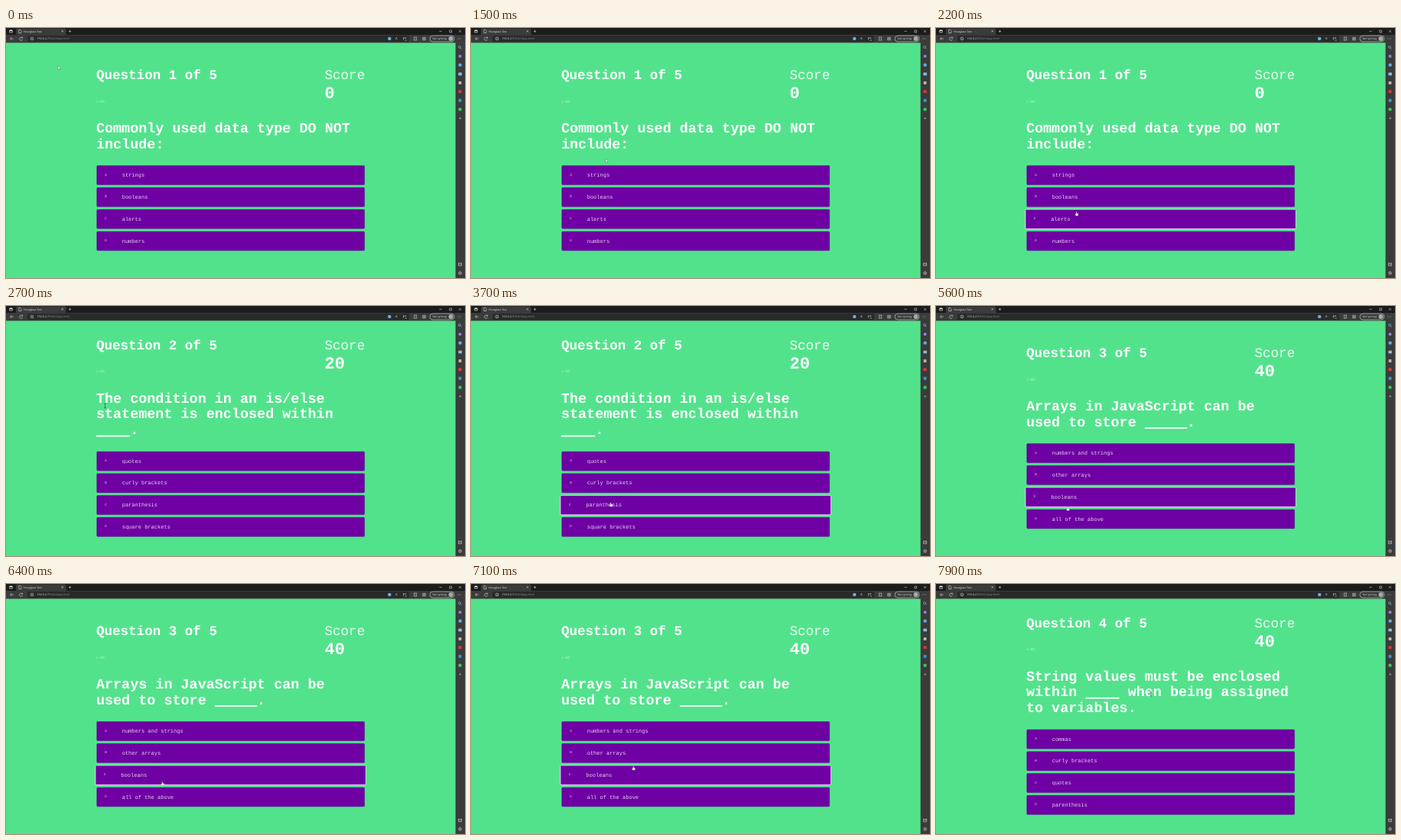
These frames come from a looping animation (600 px wide and 328 px high, 8000 ms). An HTML page:

```html
<!DOCTYPE html>
<html lang="en">
<head>
<meta charset="utf-8">
<title>Quiz</title>
<style>
  html, body { margin: 0; width: 100%; height: 100%; overflow: hidden; background: #53e28c; }
  svg { display: block; width: 100vw; height: 100vh; }
  text { white-space: pre; text-rendering: geometricPrecision; }
  .quiz { font-family: "Courier New", "Liberation Mono", monospace; fill: #fff; }
  .ui { font-family: "Open Sans", "Noto Sans", sans-serif; fill: #e6e6e6; }
  .bold { font-weight: 700; }
  .line { fill: none; stroke: #d6d6d6; stroke-width: .6; }
</style>
</head>
<body>
<svg id="stage" viewBox="0 0 600 328" xmlns="http://www.w3.org/2000/svg">
  <rect width="600" height="328" fill="#53e28c"/>
  <g id="quiz" class="quiz"></g>
  <g id="browser"></g>
  <g id="pointer">
    <path id="arrow" d="M0 0V4.2L1.1 3.3L1.9 4.9L2.7 4.5L2 3H3.2Z" fill="#fff" stroke="#333" stroke-width=".3"/>
    <path id="beam" d="M-1.2-2.8H1.2M0-2.8V2.8M-1.2 2.8H1.2" fill="none" stroke="#24543a" stroke-width=".7"/>
    <path id="hand" d="M-.5 .3Q0-.4 .5 .3V2L2.5 2.6V4.2L1.8 5.4H-.6L-1.9 3.4L-1.3 2.8L-.5 3.4Z" fill="#fff" stroke="#333" stroke-width=".2"/>
  </g>
</svg>
<script>
const LOOP = 8000;
const LINE = 20.9;
const PITCH = 28.8;
const LEFT = 117.9;
const CENTER = 293.7;
const BOX_TOP = 180.5;
const BOX_HEIGHT = 25.2;
const HEADLINE = 18.45;
const ADVANCE = HEADLINE * .6;

const questions = [
  { from: 0, score: 0,
    lines: ["Commonly used data type DO NOT", "include:"],
    choices: ["strings", "booleans", "alerts", "numbers"] },
  { from: 2600, score: 20,
    lines: ["The condition in an is/else", "statement is enclosed within", "____."],
    choices: ["quotes", "curly brackets", "paranthesis", "square brackets"] },
  { from: 4200, score: 40,
    lines: ["Arrays in JavaScript can be", "used to store _____."],
    choices: ["numbers and strings", "other arrays", "booleans", "all of the above"] },
  { from: 7600, score: 40,
    lines: ["String values must be enclosed", "within ____ when being assigned", "to variables."],
    choices: ["commas", "curly brackets", "quotes", "parenthesis"] }
];

// time, x, y of the pointer's hot spot
const path = [
  [0, 68, 50], [900, 118, 108], [1500, 176, 172], [1800, 188, 250],
  [2100, 188, 250], [2700, 129.5, 131], [3200, 180, 261], [3600, 182, 261],
  [4400, 197.5, 187.5], [5000, 188, 250], [5600, 172, 263.2], [5900, 184, 318],
  [6300, 203, 260], [6400, 204.3, 259.2], [6900, 204, 250], [7900, 281, 144]
];

const byId = id => document.getElementById(id);

function add(parent, tag, attrs, content) {
  const node = document.createElementNS("http://www.w3.org/2000/svg", tag);
  for (const key in attrs) node.setAttribute(key, attrs[key]);
  if (content !== undefined) node.textContent = content;
  parent.appendChild(node);
  return node;
}

function label(parent, x, y, size, content, attrs = {}) {
  return add(parent, "text", { x, y, "font-size": size, ...attrs }, content);
}

function buildBrowser() {
  const g = byId("browser");
  const rect = (x, y, width, height, fill, rx = 0) => add(g, "rect", { x, y, width, height, fill, rx });
  const dot = (cx, cy, r, fill) => add(g, "circle", { cx, cy, r, fill });
  const line = (d, stroke = "#d6d6d6") => add(g, "path", { d, class: "line", style: `stroke:${stroke}` });
  const ring = (cx, cy, r) => add(g, "circle", { cx, cy, r, class: "line" });
  const ui = (x, y, size, content, attrs) => label(g, x, y, size, content, { class: "ui", ...attrs });

  rect(0, 0, 600, 9.5, "#1c1c1c");
  rect(0, 9, 600, 10.4, "#3b3b3b");
  rect(587.6, 19, 12.4, 309, "#3b3b3b");
  rect(13, .5, 65.5, 9.5, "#3b3b3b", 1.5);

  rect(4.5, 2.5, 4, 3.8, "#e8e8e8", .6);
  rect(5.2, 4, 2.6, 1.6, "#1c1c1c");
  line("M16.8 2.3H18.8L20 3.5V6.5H16.8Z");
  ui(23, 5.7, 3.5, "Hourglass Test");
  line("M72.5 3L75 5.5M75 3L72.5 5.5");
  line("M81.8 4.3H85.2M83.5 2.6V6");
  line("M566.5 4.3H569.7M592 2.8L595 5.8M595 2.8L592 5.8");
  line("M579.8 3H582.6V5.8H579.8Z");

  line("M10 14H5.5M7.5 12L5.5 14L7.5 16");
  line("M21.4 13A2.1 2.1 0 1 0 21.6 15M21.6 11.7V13.2H20.1");
  rect(28, 10, 499, 8.2, "#2a2a2a", 1.5);
  ring(34, 14, 1.9);
  line("M34 13.6V15.1M34 12.6V13");
  const address = ui(40.5, 15.3, 3.7, "192.0.2.7");
  add(address, "tspan", { fill: "#8b8b8b" }, ":8040/play.html");

  rect(499.3, 12, 4, 4, "#69aee8", 1.2);
  ui(509, 15.4, 4, "A", { fill: "#8d8d8d" });
  line("M519.5 15.6V12.4L521 13.5L522.6 12.4V14M521.5 16H524");
  line("M533 12H537L536 14L537 16H533L534 14Z");
  line("M544.7 12.3H548.3V15.9H544.7ZM546.5 13V15.2M545.4 14.1H547.6");
  add(g, "rect", { x: 554, y: 10, width: 32, height: 8, rx: 4, class: "line" });
  ui(557.5, 15.3, 3.4, "Not syncing");
  dot(581.5, 14, 3, "#a9a9a9");
  for (const x of [590.6, 592.4, 594.2]) dot(x, 14, .45, "#ddd");

  add(g, "circle", { cx: 593, cy: 25, r: 1.5, class: "line", style: "stroke:#8fc3f0" });
  line("M594.1 26.1L595.6 27.6", "#8fc3f0");
  dot(593.5, 37, 2, "#8c83e6");
  rect(591.6, 46.6, 4, 4, "#5eaeea", 1);
  rect(591.3, 58.6, 4.6, 3.6, "#8fbad6", .5);
  rect(591.6, 70, 3.8, 4, "#b9b5b2", .8);
  rect(591.5, 81.3, 4, 4, "#d83b36");
  dot(593.5, 95, 2.2, "#2f94dc");
  dot(593.5, 106.7, 2.2, "#35c85a");
  line("M592 118.5H595.4M593.7 116.8V120.2", "#aaa");
  add(g, "rect", { x: 591.7, y: 308.5, width: 3.8, height: 3.4, class: "line" });
  line("M592.6 310.2H594.6");
  ring(593.6, 321.5, 1.9);
  ring(593.6, 321.5, .6);
}

function buildQuiz() {
  const g = byId("quiz");
  const head = add(g, "g", {});
  const progress = label(head, LEFT, 67.3, 17.57, "", { class: "bold" });
  label(head, 416.5, 67.3, 17.57, "Score", { opacity: .88 });
  const score = label(head, 416.5, 92, 21.96, "", { class: "bold" });
  label(head, LEFT + .4, 97.6, 4.39, "1:00", { opacity: .6 });
  const lines = [0, 1, 2].map(i => label(head, LEFT, 137 + i * LINE, HEADLINE, "", { class: "bold" }));
  const blank = add(head, "rect", { height: 1.7, fill: "#fff" });

  const list = add(g, "g", {});
  const choices = [0, 1, 2, 3].map(i => {
    const y = BOX_TOP + i * PITCH;
    const group = add(list, "g", {});
    const glow = add(group, "rect", { x: 118.4, y: y + .9, width: 350.6, height: BOX_HEIGHT, rx: 1.5, fill: "#d9c6ea" });
    const box = add(group, "rect", { x: 118.7, y, width: 350, height: BOX_HEIGHT, rx: 1.3, fill: "#6f00a4" });
    label(group, 129.3, y + 13, 4.39, "ABCD"[i], { opacity: .8 });
    const answer = label(group, 151.7, y + 14.6, 7.03, "", { opacity: .82 });
    return { group, glow, box, answer, middle: y + BOX_HEIGHT / 2 };
  });
  return { head, progress, score, lines, blank, list, choices };
}

// The answer gap is a solid bar that takes the place of the underscores.
function drawBlank(lines) {
  const row = lines.findIndex(text => text.includes("_"));
  const run = row < 0 ? "" : lines[row].match(/_+/)[0];
  view.blank.setAttribute("width", run.length * ADVANCE);
  if (!run) return;
  view.blank.setAttribute("x", LEFT + lines[row].indexOf(run) * ADVANCE);
  view.blank.setAttribute("y", 138.4 + row * LINE);
}

function pointerAt(time) {
  const next = path.findIndex(p => p[0] > time);
  if (next < 0) return path[path.length - 1].slice(1);
  const [t0, x0, y0] = path[next - 1];
  const [t1, x1, y1] = path[next];
  const u = (time - t0) / (t1 - t0);
  const k = u * u * (3 - 2 * u);
  return [x0 + (x1 - x0) * k, y0 + (y1 - y0) * k];
}

const view = buildQuiz();
buildBrowser();

function render(time) {
  const index = questions.findLastIndex(q => q.from <= time);
  const { lines, choices, score } = questions[index];
  const shift = (lines.length - 2) * LINE / 2;
  const [x, y] = pointerAt(time);

  view.progress.textContent = `Question ${index + 1} of 5`;
  view.score.textContent = score;
  view.lines.forEach((node, i) => node.textContent = (lines[i] || "").replaceAll("_", " "));
  drawBlank(lines);
  view.head.setAttribute("transform", `translate(0 ${-shift})`);
  view.list.setAttribute("transform", `translate(0 ${shift})`);

  let hovering = false;
  view.choices.forEach((choice, i) => {
    const offset = y - (BOX_TOP + shift + i * PITCH);
    const hot = x > 118 && x < 469 && offset >= 0 && offset < BOX_HEIGHT + .5;
    hovering = hovering || hot;
    const { group, glow, box, answer, middle } = choice;
    answer.textContent = choices[i];
    group.setAttribute("transform", hot
      ? `translate(${CENTER} ${middle}) scale(1.01) translate(${-CENTER} ${-middle})` : "");
    glow.setAttribute("visibility", hot ? "visible" : "hidden");
    box.setAttribute("stroke", hot ? "#eee4f6" : "#4d167f");
    box.setAttribute("stroke-width", hot ? .8 : .4);
  });

  const textTop = 122 - shift;
  const overText = x > LEFT && x < 469 && y > textTop && y < textTop + lines.length * LINE;
  const shape = hovering ? "hand" : overText ? "beam" : "arrow";
  for (const id of ["arrow", "beam", "hand"]) {
    byId(id).setAttribute("visibility", id === shape ? "visible" : "hidden");
  }
  byId("pointer").setAttribute("transform", `translate(${x} ${y})`);
}

const start = performance.now();
function tick() {
  render((performance.now() - start) % LOOP);
  requestAnimationFrame(tick);
}
tick();
</script>
</body>
</html>
```
